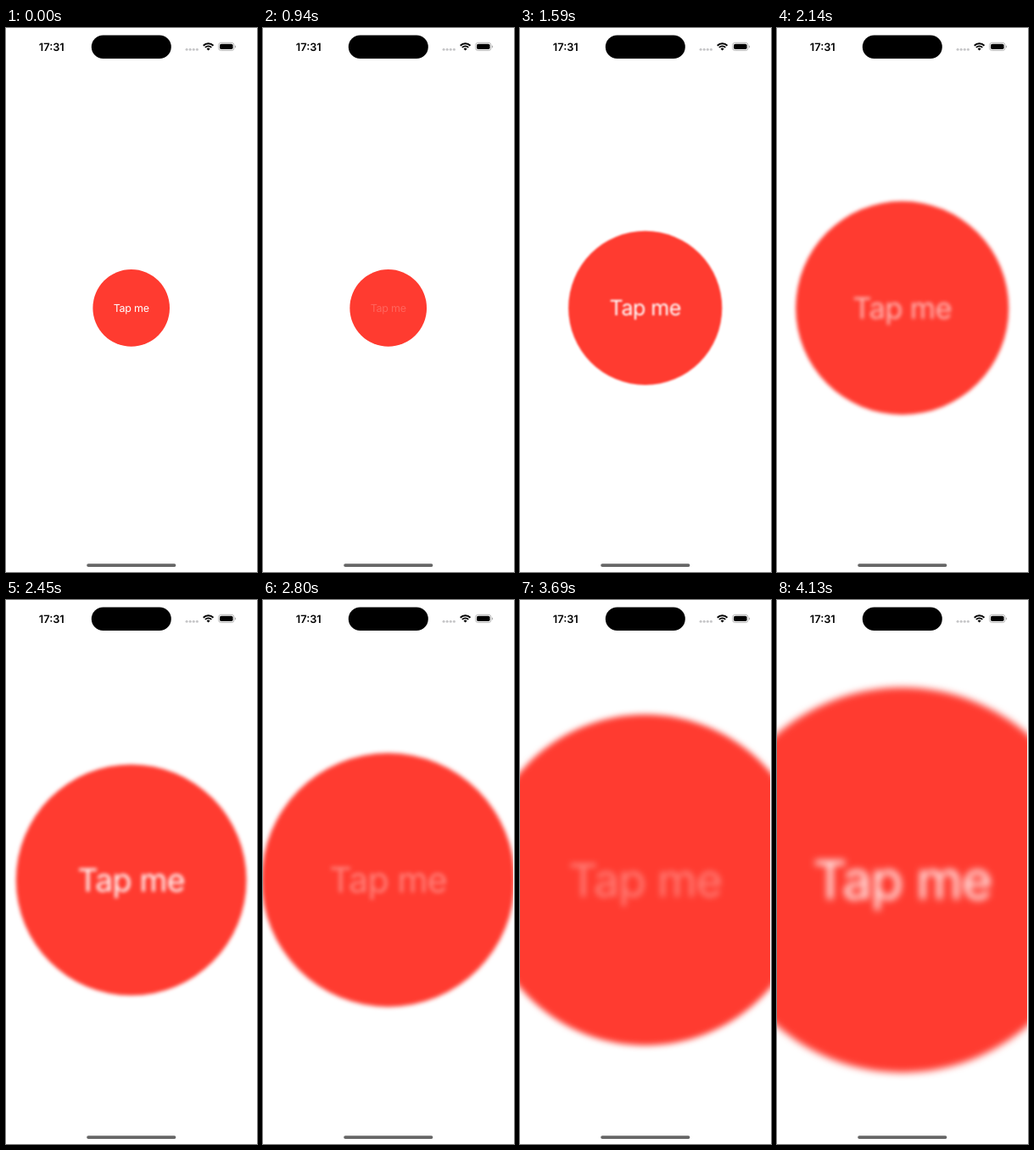
An HTML page for the animation above (5.86 s loop, 296 px wide and 640 px high).

```html
<!DOCTYPE html>
<html lang="en">
<head>
<meta charset="utf-8">
<title>Tap me</title>
<style>
  html, body { margin: 0; width: 100%; height: 100%; overflow: hidden; background: #fff; }
  svg { display: block; width: 296px; height: 640px; }
  text { font-family: Inter, "Liberation Sans", sans-serif; text-anchor: middle; text-rendering: geometricPrecision; }
  #label { font-size: 12.5px; letter-spacing: -.02em; fill: #fff; }
  .clock { font-size: 12.8px; font-weight: 600; }
  .wifi { fill: none; stroke: #000; stroke-width: 1.9; }
</style>
</head>
<body>
<svg viewBox="0 0 296 640">
  <clipPath id="screen"><rect width="295" height="640"/></clipPath>
  <g clip-path="url(#screen)">
    <g id="soft">
      <g id="button">
        <circle r="45.3" fill="#ff3b30"/>
        <text id="label" x="0" y="4.5">Tap me</text>
      </g>
    </g>
  </g>

  <text class="clock" x="53.8" y="26.6">17:31</text>
  <rect x="100.8" y="8.5" width="94" height="27.6" rx="13.8"/>
  <g fill="#c6c6c8">
    <circle cx="213.1" cy="25.3" r="1.5"/>
    <circle cx="217.2" cy="25.3" r="1.5"/>
    <circle cx="221.3" cy="25.3" r="1.5"/>
    <circle cx="225.4" cy="25.3" r="1.5"/>
  </g>
  <path class="wifi" d="M232.73 20.73A8.3 8.3 0 0 1 244.47 20.73M234.92 22.92A5.2 5.2 0 0 1 242.28 22.92"/>
  <path d="M238.6 26.6L236.55 24.55A2.9 2.9 0 0 1 240.65 24.55Z"/>
  <rect x="250.6" y="17.3" width="18.4" height="9.2" rx="3" fill="none" stroke="#a6a6a6" stroke-width=".8"/>
  <rect x="252" y="18.7" width="15.6" height="6.4" rx="1.8"/>
  <path d="M270 20.4a1.6 1.6 0 0 1 0 3z" fill="#a6a6a6"/>
  <rect x="95.2" y="630.2" width="105.2" height="3.8" rx="1.9" fill="#666"/>
</svg>
<script>
  const LOOP = 5860;
  const OMEGA = 2 * Math.PI / 0.55;
  const SETTLED = 0.53;   // seconds until the spring rests
  const FADE = 450;       // label recovery after release, ms
  const taps = [
    { down: 940, up: 936 },
    { down: 1893, up: 1893 },
    { down: 2690, up: 2705 },
    { down: 3580, up: 3595 }
  ];
  // The picture refreshes only at these moments.
  const ticks = [
    0, 940, 1050, 1160, 1310, 1450, 1590,
    1930, 2040, 2140, 2240, 2340, 2450,
    2690, 2800, 2900, 3010, 3120, 3240,
    3580, 3690, 3790, 3900, 4020, 4130
  ];
  const [soft, button, label] = ["soft", "button", "label"].map(id => document.getElementById(id));

  // Critically damped spring from 0 to 1.
  function spring(ms) {
    const s = ms / 1000;
    if (s <= 0) return 0;
    if (s > SETTLED) return 1;
    return 1 - (1 + OMEGA * s) * Math.exp(-OMEGA * s);
  }

  function labelOpacity(t) {
    const tap = taps.filter(p => p.down <= t).pop();
    if (!tap) return 1;
    return 0.2 + 0.8 * Math.min(1, Math.max(0, (t - tap.up) / FADE));
  }

  function draw(t) {
    const scale = taps.reduce((sum, p) => sum + spring(t - p.up), 1);
    const blur = (scale - 1) * 1.13;
    button.setAttribute("transform", `translate(147.7 329.4) scale(${scale})`);
    soft.style.filter = blur > 0.01 ? `blur(${blur}px)` : "none";
    label.setAttribute("opacity", labelOpacity(t));
  }

  const start = performance.now();
  let shown = -1;
  function frame() {
    const t = (performance.now() - start) % LOOP;
    const tick = ticks.filter(k => k <= t).pop();
    if (tick !== shown) draw(shown = tick);
    requestAnimationFrame(frame);
  }
  frame();
</script>
</body>
</html>
```
